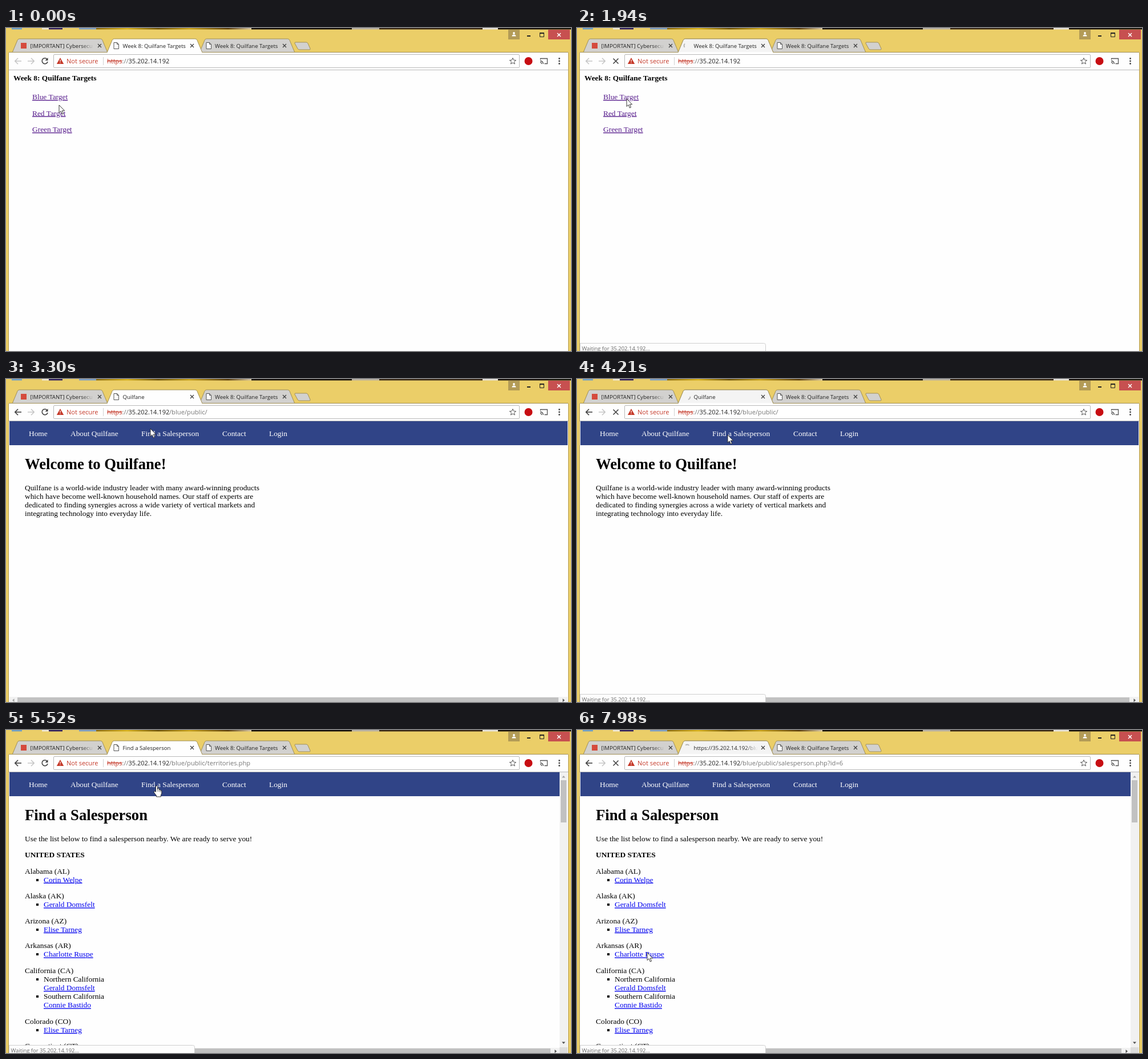
These frames come from a looping animation (990x566 px, 8000 ms). An HTML page:

```html
<!DOCTYPE html>
<html lang="en">
<head>
<meta charset="utf-8">
<title>Browser session</title>
<style>
html, body { margin: 0; width: 100%; height: 100%; overflow: hidden; background: #ebce68; }
svg { display: block; }
text { white-space: pre; }
.ui { font-family: "Open Sans", "Noto Sans", sans-serif; font-size: 9.6px; fill: #222; }
.url { font-size: 11px; }
.path { font-size: 11.2px; fill: #777; }
.status text { font-size: 9.45px; fill: #666; }
.page { font-family: "Liberation Serif", "Times New Roman", serif; font-size: 13.4px; }
.page h1, .h1 { font-size: 26.7px; }
.b { font-weight: bold; }
.link { fill: #00e; text-decoration: underline; }
.visited { fill: #551a8b; }
.line { fill: none; stroke: #555; }

/* every layer switches hard on one 8 s clock */
.k { animation: 8s step-end infinite; }
.start { animation-name: start; }
.home { animation-name: home; }
.list { animation-name: list; }
.site { animation-name: site; }
.load { animation-name: load; }
.idle { animation-name: idle; }
.titleList { animation-name: titleList; }
.late { animation-name: late; }
.pathHome { animation-name: pathHome; }
.linkBlue { animation-name: linkBlue; }
.linkFind { animation-name: linkFind; }
.linkPerson { animation-name: linkPerson; }
.wait { animation-name: wait; }
.arrow { animation-name: arrow; }
.hand { animation-name: hand; }
.cursor { animation-name: move; }
.spin { animation: spin 1.6s steps(12) infinite; transform-origin: 193px 31px; }

@keyframes start { 0% { opacity: 1 } 29.625%, 100% { opacity: 0 } }
@keyframes home { 0% { opacity: 0 } 29.625% { opacity: 1 } 63.125%, 100% { opacity: 0 } }
@keyframes list { 0% { opacity: 0 } 63.125%, 100% { opacity: 1 } }
@keyframes site { 0% { opacity: 0 } 29.625%, 100% { opacity: 1 } }
@keyframes load { 0%, 29.625%, 63.125% { opacity: 0 } 15.625%, 49.375%, 94.875%, 100% { opacity: 1 } }
@keyframes idle { 0%, 29.625%, 63.125% { opacity: 1 } 15.625%, 49.375%, 94.875%, 100% { opacity: 0 } }
@keyframes titleList { 0%, 98.125%, 100% { opacity: 0 } 63.125% { opacity: 1 } }
@keyframes late { 0% { opacity: 0 } 98.125%, 100% { opacity: 1 } }
@keyframes pathHome { 0%, 63.125%, 100% { opacity: 0 } 27.625% { opacity: 1 } }
@keyframes linkBlue { 0%, 15.625%, 100% { opacity: 0 } 5.375% { opacity: 1 } }
@keyframes linkFind { 0%, 49.375%, 100% { opacity: 0 } 45% { opacity: 1 } }
@keyframes linkPerson { 0%, 94.875%, 100% { opacity: 0 } 83.125% { opacity: 1 } }
@keyframes wait { 0%, 31.375%, 70.75% { opacity: 0 } 15.625%, 49.375%, 94.875%, 100% { opacity: 1 } }
@keyframes arrow { 0%, 15.625%, 49.375%, 70.75%, 94.875%, 100% { opacity: 1 } 5.375%, 45%, 66.25%, 83.125% { opacity: 0 } }
@keyframes hand { 0%, 15.625%, 49.375%, 70.75%, 94.875%, 100% { opacity: 0 } 5.375%, 45%, 66.25%, 83.125% { opacity: 1 } }
@keyframes move {
  0% { transform: translate(93px, 135px) }
  1.75% { transform: translate(93px, 132px) }
  3.5625% { transform: translate(92px, 129px) }
  5.375% { transform: translate(90px, 126px) }
  7.1875% { transform: translate(88px, 125px) }
  9% { transform: translate(87px, 124px) }
  35% { transform: translate(100px, 122px) }
  36.75% { transform: translate(140px, 112px) }
  38.875% { transform: translate(205px, 95px) }
  41.25% { transform: translate(253px, 87px) }
  42.75% { transform: translate(260px, 91px) }
  45% { transform: translate(263px, 96px) }
  47.75% { transform: translate(264px, 98px) }
  70.75% { transform: translate(255px, 150px) }
  72.5% { transform: translate(225px, 215px) }
  74.25% { transform: translate(190px, 270px) }
  76% { transform: translate(170px, 304px) }
  77.875% { transform: translate(160px, 322px) }
  79.625% { transform: translate(148px, 350px) }
  81.375% { transform: translate(135px, 380px) }
  83.125% { transform: translate(127px, 396px) }
  84.75% { transform: translate(123px, 399px) }
  86.5% { transform: translate(124px, 396px) }
  88.25% { transform: translate(124px, 393px) }
  90%, 100% { transform: translate(123px, 390px) }
}
@keyframes spin { to { transform: rotate(-360deg) } }
</style>
</head>
<body>
<svg width="990" height="566" viewBox="0 0 990 566">
  <defs>
    <linearGradient id="fade1" gradientUnits="userSpaceOnUse" x1="132" x2="154" y1="0" y2="0">
      <stop stop-color="#222"/><stop offset="1" stop-color="#222" stop-opacity="0"/>
    </linearGradient>
    <linearGradient id="fade2" gradientUnits="userSpaceOnUse" x1="294" x2="317" y1="0" y2="0">
      <stop stop-color="#222"/><stop offset="1" stop-color="#222" stop-opacity="0"/>
    </linearGradient>
    <linearGradient id="strip">
      <stop stop-color="#8a6a10"/><stop offset=".2" stop-color="#d9b21c"/><stop offset=".4" stop-color="#6d5208"/>
      <stop offset=".6" stop-color="#c9a21a"/><stop offset=".85" stop-color="#5a3d0c"/><stop offset="1" stop-color="#d8c8a8"/>
    </linearGradient>
    <path id="tab" d="M0 43L9 21.500Q10 19 12.500 19H154.500Q157 19 158 21.500L167 43"/>
    <path id="x" d="M-3-3L3 3M3-3L-3 3"/>
    <g id="doc"><path d="M-4-5.500H1.500L4.500-2.500V5.500H-4Z" fill="#fff" stroke="#555"/><path d="M1.500-5.500V-2.500H4.500" class="line"/></g>
  </defs>

  <!-- window frame -->
  <rect width="990" height="566" fill="#ebce68"/>
  <g id="desk"></g>
  <path d="M4.500 43V566M985.500 43V566" stroke="#b59c50"/>
  <rect x="880" y="3" width="20" height="17" fill="#b39b56"/>
  <circle cx="890" cy="9" r="1.900" fill="#fff"/><path d="M886.500 14.500q0-3 3.500-3t3.500 3z" fill="#fff"/>
  <path d="M913 14H919" stroke="#222" stroke-width="2"/>
  <path d="M935.500 9H942.500V15.500H935.500Z" class="line" style="stroke:#222"/><path d="M935 9H943" stroke="#222" stroke-width="2"/>
  <rect x="950" y="3" width="38" height="17" fill="#c75050"/>
  <use href="#x" x="969" y="12" stroke="#fff" stroke-width="1.500"/>

  <!-- tabs -->
  <g fill="#d2d1cf" stroke="#a19057">
    <use href="#tab" x="11"/><use href="#tab" x="339"/>
    <path d="M507 25H526Q528 25 529 27L533 36Q533.500 38 532 38H514Q512 38 511 36L506 27Q505.500 25 507 25Z"/>
  </g>
  <rect x="5" y="43" width="980" height="523" fill="#fefefe"/>
  <path d="M5 42.500H985" stroke="#a19057"/>
  <use href="#tab" x="177" fill="#fefefe" stroke="#a19057"/>
  <use href="#tab" x="177" fill="#f4f4f4" stroke="#a19057" class="k load"/>
  <path d="M178 43H343" stroke="#fefefe" stroke-width="2"/>
  <rect x="26" y="26" width="10" height="10" fill="#d54b3d"/>
  <use href="#doc" x="355" y="31"/>
  <use href="#doc" x="193" y="31" class="k idle"/>
  <g class="k load"><path class="spin" d="M188.300 28.400A5.400 5.400 0 0 1 193.900 25.700" fill="none" stroke="#999" stroke-width="1.300"/></g>
  <g stroke="#444" stroke-width="1.400">
    <use href="#x" x="164" y="31"/><use href="#x" x="326" y="31"/><use href="#x" x="488" y="31"/>
  </g>
  <g class="ui">
    <text x="42.500" y="34.500" fill="url(#fade1)" style="fill:url(#fade1)">[IMPORTANT] Cybersecu</text>
    <text x="366" y="34.500">Week 8: Quilfane Targets</text>
    <text x="204.500" y="34.500" class="k start">Week 8: Quilfane Targets</text>
    <text x="204.500" y="34.500" class="k home">Quilfane</text>
    <text x="204.500" y="34.500" class="k titleList">Find a Salesperson</text>
    <text x="204.500" y="34.500" class="k late" style="fill:url(#fade2)">https://35.202.14.192/blu</text>
  </g>

  <!-- toolbar -->
  <path d="M5 73.500H985" stroke="#b8b8b8"/>
  <rect x="83.500" y="46.500" width="816" height="23" rx="1.500" fill="#fff" stroke="#b9b9b9"/>
  <g fill="none" stroke-width="1.600">
    <path id="back" d="M27 58H16M21 52.800L15.800 58L21 63.200" stroke="#c6c6c6"/>
    <path d="M38 58H49M44 52.800L49.200 58L44 63.200" stroke="#c6c6c6"/>
    <path class="k site" d="M27 58H16M21 52.800L15.800 58L21 63.200" stroke="#444"/>
    <g class="k idle"><path d="M72 54.500A5 5 0 1 0 73 59" stroke="#444"/><path d="M73.500 52V57H68.500Z" fill="#444"/></g>
    <path class="k load" d="M63.500 53.500L72.500 62.500M72.500 53.500L63.500 62.500" stroke="#444"/>
  </g>
  <path d="M95 52L101.200 63H88.800Z" fill="#c53929"/>
  <path d="M95 55.500V59M95 60.200V61.600" stroke="#fff" stroke-width="1.200"/>
  <path d="M170.500 51V65" stroke="#d0d0d0"/>
  <g class="ui url">
    <text x="106" y="62" fill="#c53929" style="fill:#c53929">Not secure</text>
    <text x="177" y="62"><tspan fill="#c53929" text-decoration="line-through">https</tspan><tspan fill="#777">://</tspan>35.202.14.192</text>
    <g class="path">
      <text x="286" y="62" class="k pathHome">/blue/public/</text>
      <text x="286" y="62" class="k titleList">/blue/public/territories.php</text>
      <text x="286" y="62" class="k late">/blue/public/salesperson.php?id=6</text>
    </g>
  </g>
  <path d="M888 52.500L889.600 56.200L893.600 56.500L890.500 59.100L891.500 63L888 60.900L884.500 63L885.500 59.100L882.400 56.500L886.400 56.200Z" class="line"/>
  <circle cx="915.500" cy="58" r="7" fill="#c70d12"/>
  <path d="M936.500 55.500V53.500H948.500V62.500H943.500M936 57.500Q941 58 941.500 63M936 60Q938.500 60.500 939 63" class="line" stroke-width="1.300"/>
  <g fill="#444"><circle cx="969.500" cy="53.500" r="1.400"/><circle cx="969.500" cy="58" r="1.400"/><circle cx="969.500" cy="62.500" r="1.400"/></g>

  <!-- pages -->
  <g class="page">
    <g class="k start">
      <text x="13" y="92" class="b">Week 8: Quilfane Targets</text>
      <text x="46" y="125" class="link visited">Blue Target</text>
      <text x="46" y="153.500" class="link visited">Red Target</text>
      <text x="46" y="182" class="link visited">Green Target</text>
    </g>
    <g class="k site">
      <rect x="6" y="74" width="978" height="42" fill="#304487"/>
      <g fill="#fff">
        <text x="40" y="100">Home</text><text x="113" y="100">About Quilfane</text>
        <text x="237" y="100">Find a Salesperson</text><text x="379" y="100">Contact</text><text x="461" y="100">Login</text>
      </g>
    </g>
    <g class="k home">
      <text x="33" y="158" class="b h1">Welcome to Quilfane!</text>
      <text x="33" y="194.500">Quilfane is a world-wide industry leader with many award-winning products</text>
      <text x="33" y="209.700">which have become well-known household names. Our staff of experts are</text>
      <text x="33" y="224.800">dedicated to finding synergies across a wide variety of vertical markets and</text>
      <text x="33" y="240">integrating technology into everyday life.</text>
      <rect x="6" y="557" width="978" height="9" fill="#f1f1f1"/>
      <rect x="20" y="558" width="948" height="8" fill="#c1c1c1"/>
      <path d="M14.500 560V566L11 563Z" fill="#a3a3a3"/><path d="M975.500 560V566L979 563Z" fill="#505050"/>
    </g>
    <g class="k list">
      <text x="33" y="158" class="b h1">Find a Salesperson</text>
      <text x="33" y="194.500">Use the list below to find a salesperson nearby. We are ready to serve you!</text>
      <text x="33" y="223" class="b">UNITED STATES</text>
      <g id="people"></g>
      <rect x="6" y="557" width="964" height="9" fill="#f1f1f1"/>
      <rect x="20" y="558" width="934" height="8" fill="#c1c1c1"/>
      <path d="M14.500 560V566L11 563Z" fill="#a3a3a3"/><path d="M961.500 560V566L965 563Z" fill="#505050"/>
      <rect x="970" y="74" width="14" height="483" fill="#f1f1f1"/>
      <rect x="970" y="556" width="14" height="10" fill="#dcdcdc"/>
      <rect x="972" y="88" width="10" height="74" fill="#c1c1c1"/>
      <path d="M974 83.500H980L977 80Z" fill="#a3a3a3"/><path d="M974 546.500H980L977 550Z" fill="#505050"/>
    </g>
  </g>

  <g class="ui status" id="status"></g>

  <g class="k cursor">
    <path class="k arrow" d="M0 0V13.500L3.100 10.700L5.300 16L7.500 15L5.300 9.900H9.600Z" fill="#fff" stroke="#222" stroke-width=".9"/>
    <g class="k hand">
      <path d="M-1.500 10.500V1.200A1.500 1.500 0 0 1 1.500 1.200V6.200Q4-.1 4.300 6.900Q6.600 6 6.800 7.800Q8.800 7.300 8.800 9.500V13L7.300 16.500V19H-.5V17L-4.600 11.400Q-5 9-3.200 9.300Z" fill="#fff" stroke="#222" stroke-width=".9"/>
      <path d="M1.700 6V10M4.300 7V10.500M6.800 8V11" class="line" stroke-width=".8"/>
    </g>
  </g>
</svg>
<script>
const put = (id, html) => { document.getElementById(id).innerHTML = html; };

// desktop sliver above the window
put("desk", [
  [10, 18, "#6fa0c8"], [63, 12, "#f0ead8"], [75, 24, "#33235f"], [128, 30, "#7f9fc4"],
  [158, 272, "url(#strip)"], [430, 176, "#17120c"], [606, 48, "#b9b2a4"],
  [654, 181, "#3a2a18"], [835, 27, "#e8e4dc"], [862, 128, "#1a140e"]
].map(([x, w, c]) => `<rect x="${x}" width="${w}" height="2.500" fill="${c}"/>`).join(""));

// "*" marks a bullet, "@" a linked name
const rows = [
  ["Alabama (AL)", "*@Corin Welpe"],
  ["Alaska (AK)", "*@Gerald Domsfelt"],
  ["Arizona (AZ)", "*@Elise Tarneg"],
  ["Arkansas (AR)", "*@Charlotte Ruspe"],
  ["California (CA)", "*Northern California", "@Gerald Domsfelt", "*Southern California", "@Connie Bastido"],
  ["Colorado (CO)", "*@Elise Tarneg"],
  ["Connecticut (CT)"]
];
let y = 251.500, people = "";
for (const [state, ...items] of rows) {
  people += `<text x="33" y="${y}">${state}</text>`;
  for (const item of items) {
    y += 15.100;
    if (item[0] === "*") people += `<rect x="53" y="${Math.round(y - 6)}" width="4" height="4"/>`;
    const link = item.includes("@") ? "link" : "";
    people += `<text x="66" y="${y}" class="${link}">${item.replace(/[*@]/g, "")}</text>`;
  }
  y += 28.500;
}
put("people", people);

const site = "https://35.202.14.192/blue/public/";
put("status", [
  ["linkBlue", site, "#f3f3f3"],
  ["linkFind", site + "territories.php", "#f3f3f3"],
  ["linkPerson", site + "salesperson.php?id=6", "#f3f3f3"],
  ["wait", "Waiting for 35.202.14.192...", "#fdfdfd"]
].map(([name, label, fill]) => `<g class="k ${name}">
  <path d="M5.500 567V552.500H327.500Q330.500 552.500 330.500 555.500V567Z" fill="${fill}" stroke="#cfcfcf"/>
  <text x="8.500" y="565">${label}</text></g>`).join(""));
</script>
</body>
</html>
```
